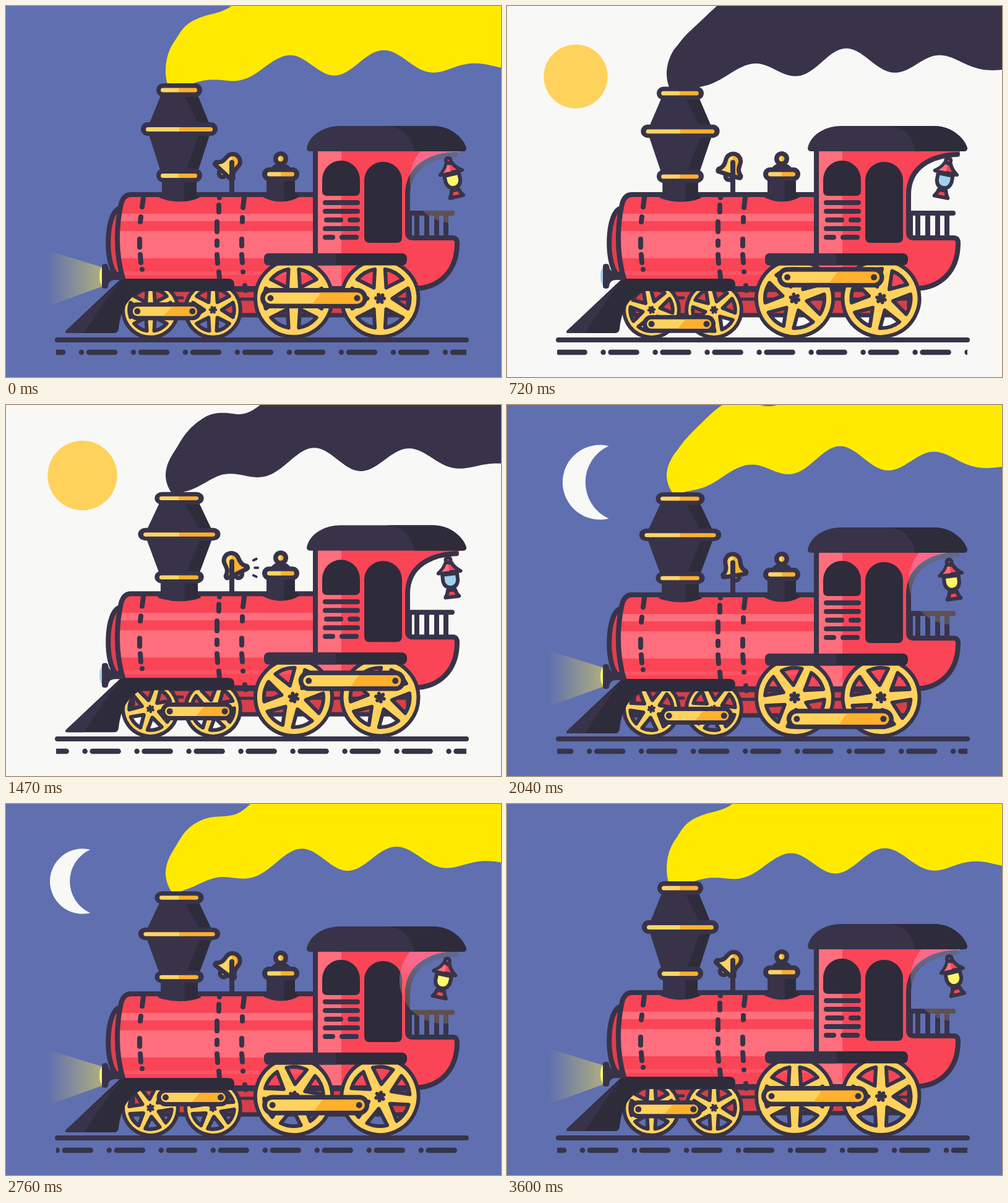
Animation of 800 by 600 pixels, one loop 3.63 s. Source, as an HTML page:

```html
<!DOCTYPE html>
<html lang="en">
<head>
<meta charset="utf-8">
<title>Steam train, day and night</title>
<style>
  html, body { margin: 0; height: 100%; overflow: hidden; }
  svg { display: block; width: 800px; height: 600px;
    --dark: #383349; --deep: #2e2b3b; --red: #fa4557; --pink: #ff6e7c; --gold: #ffd25c; --amber: #ffb02d;
    --sky: #f8f8f6; --smoke: #383349; --glass: #a0d0f2; background: var(--sky); }
  svg.night { --sky: #5f6fb0; --smoke: #ffea00; --glass: #fff66a; }
  svg:not(.night) .lit { display: none; }
  .dark { fill: var(--dark); } .deep { fill: var(--deep); }
  .red { fill: var(--red); } .pink { fill: var(--pink); }
  .gold { fill: var(--gold); } .amber { fill: var(--amber); } .glass { fill: var(--glass); }
  .split { fill: url(#split); }
  .line { stroke: var(--dark); stroke-width: 8; stroke-linecap: round; stroke-linejoin: round; }
  .open { fill: none; }
</style>
</head>
<body>
<svg id="stage" viewBox="0 0 800 600">
  <defs>
    <linearGradient id="split"><stop offset=".5" stop-color="#ffd567"/><stop offset=".5" stop-color="#ffb02d"/></linearGradient>
    <linearGradient id="bellGold" gradientUnits="userSpaceOnUse" x1="-40" x2="40">
      <stop offset=".5" stop-color="#ffd567"/><stop offset=".5" stop-color="#ffb02d"/>
    </linearGradient>
    <linearGradient id="beam"><stop stop-color="#ffee50" stop-opacity="0"/><stop offset="1" stop-color="#ffee50" stop-opacity=".5"/></linearGradient>
    <linearGradient id="glowFill" x2="0" y2="1"><stop offset=".3" stop-color="#5f698c"/><stop offset=".7" stop-color="#5f5052"/></linearGradient>
    <clipPath id="track"><path d="M81 550H744V570H81Z"/></clipPath>
    <g id="wheel">
      <path id="rim" class="gold line" fill-rule="evenodd" vector-effect="non-scaling-stroke" style="stroke-width:6"/>
      <circle class="dark" r="6"/>
      <circle r="6.5" fill="none" class="line" style="stroke-width:6" stroke-dasharray="0 6.807"/>
    </g>
  </defs>

  <circle id="sun" class="gold" r="52"/>
  <path id="moon" fill="#f8f8f6" d="M13-51A52.5 52.5 0 1 0 13 51A56 56 0 0 1 13-51Z"/>
  <path id="smoke" fill="var(--smoke)"/>

  <g class="bob">
    <path class="lit" fill="url(#beam)" d="M157 423L66 395V486L157 453Z"/>
    <!-- chassis -->
    <path class="line" fill="#d63f49" style="stroke-width:7" d="M205 459H650V500H205Z"/>
    <path class="line open" style="stroke-width:5" d="M378 474H650M274 472H285"/>
    <!-- boiler -->
    <path class="line" fill="#de404f" d="M186 327C160 328 158 425 182 438"/>
    <path class="red" d="M500 305H202Q190 305 186 320Q172 385 190 445L370 457H500Z"/>
    <path class="pink" d="M185 336H500V348H185ZM182 364H500V408H182Z"/>
    <path fill="#fc5465" d="M190 429H500V435H190Z"/>
    <path class="line open" d="M500 305H202Q190 305 186 320Q172 385 190 445M370 457H500"/>
    <path class="line open" d="M222 310L220 325M218 341L217 349M216 377V390M217 402L218 415M220 426V426M345 310V310M344 322V333M341 349V365M341 380V387M341 402L342 416M344 430L345 440M385 310L383 326M382 342V349M381 377V388M381 402L382 415M383 430V430M386 452L387 460"/>
    <!-- cab -->
    <g class="line open">
      <path d="M654 335H721"/>
      <path style="stroke-linecap:butt" d="M664 335V374M680 335V374M696 335V374M711 335V374M652 335V374"/>
    </g>
    <path class="red" d="M500 230H732V240C690 241 649 258 649 305V366Q649 375 658 375H722Q730 375 729 386C728 430 700 456 660 457H500Z"/>
    <path class="pink" d="M504 230H542V457H504Z"/>
    <path class="line open" d="M500 232V402M728 240C690 241 649 258 649 305V366Q649 375 658 375H722Q730 375 729 386C728 430 700 456 660 457H500"/>
    <path class="deep" d="M511 281a30.5 31 0 0 1 61 0V299q0 8-8 8H519q-8 0-8-8ZM579 282a30.5 30 0 0 1 61 0V374q0 9-9 9H588q-9 0-9-9Z"/>
    <path class="line open" d="M516 318H568M516 332H568M518 346H541M556 346H568M516 360H568M516 374H528M543 374H566"/>
    <g class="roof">
      <circle id="glow" class="lit" r="70" fill="url(#glowFill)" style="mix-blend-mode:lighten"/>
      <g id="lantern" class="line" style="stroke-width:6">
        <circle class="pink" cy="4" r="4"/>
        <path class="red" d="M-5 9H5Q8 17 18 24H-18Q-8 17-5 9Z"/>
        <path class="pink" stroke="none" d="M-4 11H0V22H-13Q-6 17-4 11Z"/>
        <path class="glass" d="M-12 27H12V38Q10 49 0 49T-12 38Z"/>
        <path class="red" d="M-6 53H6Q7 59 11 64H-11Q-7 59-6 53Z"/>
      </g>
    </g>
    <g class="roof">
      <path class="dark" d="M486 230C490 208 515 194 540 194H690C720 194 740 215 744 230Q744 235 738 235H492Q486 235 486 230Z"/>
      <path class="deep" d="M615 194H690C720 194 740 215 744 230Q744 235 738 235H660Q652 196 615 194Z"/>
    </g>
    <!-- steam dome -->
    <path class="dark" d="M421 276H467V302Q475 306 473 309Q444 324 415 309Q413 306 421 302Z"/>
    <path class="deep" d="M449 276H467V302Q475 306 473 309Q463 315 449 316Z"/>
    <path class="dark" d="M426 265Q432 254 444 254T462 265Z"/>
    <circle class="dark" cx="444" cy="247" r="12"/>
    <circle class="split" cx="444" cy="247" r="4.5"/>
    <rect class="dark" x="414" y="261" width="60" height="22" rx="11"/>
    <rect class="split" x="422" y="268.500" width="44" height="7" rx="3.500"/>
    <!-- bell -->
    <g transform="translate(365 253)">
      <g id="bell" class="line" style="stroke-width:7">
        <circle cx="1" cy="23" r="6" fill="url(#bellGold)"/>
        <path fill="url(#bellGold)" d="M-12-2A12 12 0 0 1 12-2V4Q12 12 19 17Q20 21 17 21H-17Q-20 21-19 17Q-12 12-12 4Z"/>
      </g>
      <path class="line" d="M0 0V50"/>
      <path id="ring" class="line open" style="stroke-width:4"/>
    </g>
    <!-- chimney -->
    <g id="stack">
      <path class="dark" d="M252 140H308L332 199L308 274V306Q314 308 312 310Q280 323 248 310Q246 308 252 306V274L228 199Z"/>
      <path class="deep" d="M286 140H308L332 199L308 274V306Q314 308 312 310Q302 315 288 316V274L315 199Z"/>
      <g class="dark">
        <rect x="243" y="125" width="74" height="22" rx="11"/>
        <rect x="218" y="188" width="124" height="22" rx="11"/>
        <rect x="243" y="263" width="74" height="22" rx="11"/>
      </g>
      <g class="split">
        <rect x="250" y="132.500" width="59" height="7" rx="3.500"/>
        <rect x="226" y="196" width="108" height="7" rx="3.500"/>
        <rect x="250" y="271" width="59" height="7" rx="3.500"/>
      </g>
    </g>
  </g>

  <g id="wheels"></g>
  <g id="rods"></g>

  <g class="bob">
    <path class="deep" d="M186 441H360Q369 441 369 451T360 461H218Q186 478 182 522Q181 529 175 529H98Q94 528 98 524Z"/>
    <path class="dark" d="M188 443L98 524Q94 528 98 529H126L168 466Z"/>
    <path class="glass" d="M157 421Q151 424 151 437T157 453Z"/>
    <path class="dark" d="M155 421q0-4 5-4t5 4q1 9 11 9H190V443H176q-10 0-11 10q0 4-5 4t-5-4Z"/>
    <rect class="deep" x="417" y="400" width="231" height="19.500" rx="8"/>
    <path class="dark" d="M533 400H425Q417 400 417 408V411.500Q417 419.500 425 419.500H533Z"/>
  </g>

  <path class="line" d="M83 540H744"/>
  <g clip-path="url(#track)"><path id="sleepers" class="line" style="stroke-width:8.500" stroke-dasharray="42 30 0 12" d="M-84 560H800"/></g>
</svg>

<script>
const LOOP = 3630, STEP = 30, CYCLE = 3600, DAWN = 30, DUSK = 1830;
const $ = id => document.getElementById(id);
const rad = deg => deg * Math.PI / 180;
const place = (el, transform) => el.setAttribute('transform', transform);
// cosine running `turns` times per cycle
const wave = (t, turns, shift = 0) => Math.cos(2 * Math.PI * turns * t / CYCLE + rad(shift));

const polar = (r, deg) => `${r * Math.cos(rad(deg))} ${r * Math.sin(rad(deg))}`;
let rim = 'M62 0A62 62 0 1 1-62 0A62 62 0 1 1 62 0Z';
for (let a = 0; a < 360; a += 60)
  rim += `M${polar(20, a)}L${polar(48, a - 20)}A48 48 0 0 1 ${polar(48, a + 20)}Z`;
$('rim').setAttribute('d', rim);

const wheels = [[233.5, 491.5, .715, 6], [334.5, 491.5, .715, 6], [465, 473, 1, 4], [604.5, 473, 1, 4]];
$('wheels').innerHTML = '<use href="#wheel"/>'.repeat(wheels.length);

// cx, cy, rx, ry, phase, turns, length, outer radius, inner radius
const rods = [[238.6, 490.8, 26.5, 24, 173, 6, 89, 14.5, 7.5], [464.5, 472.5, 37, 35.5, 180, 4, 140, 16.5, 9]];
const capsule = (len, r, cls) => `<rect class="${cls}" x="${-r}" y="${-r}" width="${len + 2 * r}" height="${2 * r}" rx="${r}"/>`;
$('rods').innerHTML = rods.map(([, , , , , , len, outer, r]) => `<g>${capsule(len, outer, 'dark')}${capsule(len, r, 'gold')}
  <path class="amber" d="M${len / 2 + 11} ${-r}H${len}a${r} ${r} 0 0 1 0 ${2 * r}H${len / 2 - 2}Z"/>
  <circle class="dark" r="5"/><circle class="dark" cx="${len}" r="5"/></g>`).join('');

// Catmull-Rom through evenly spaced values
function curve(values, x0, gap, x) {
  const u = (x - x0) / gap, i = Math.floor(u), f = u - i;
  const v = k => values[Math.max(0, Math.min(values.length - 1, i + k))];
  const [a, b, c, d] = [v(-1), v(0), v(1), v(2)];
  return b + f / 2 * (c - a + f * (2 * a - 5 * b + 4 * c - d + f * (3 * (b - c) + d - a)));
}
const between = (low, high, c) => (low + high) / 2 + (high - low) / 2 * c;

const TOP_HIGH = [88, 46, 20, 0, -18, -27, -32, -40, -50], TOP_LOW = [90, 57, 36, 24, 16, 7, 1, -8, -30];
const BASE_HIGH = [142, 107, 79, 67, 67, 73, 88, 98], BASE_LOW = [142, 126, 113, 109, 106, 104, 102, 100];

function smokePath(t, stretch) {
  const ripple = (x, crest) => Math.cos(2 * Math.PI * ((x - crest) / 160 - 8 * t / CYCLE));
  const top = x => between(curve(TOP_HIGH, 260, 30, x), curve(TOP_LOW, 260, 30, x), ripple(x, 345)) - 16 * stretch;
  const base = x => between(curve(BASE_HIGH, 280, 80, x), curve(BASE_LOW, 280, 80, x), -ripple(x, 612))
    + stretch * Math.min(4, -12 + (x - 280) * .1);
  let d = `M270 146C254 124 254 ${top(270) + 25} 270 ${top(270)}`;
  for (let x = 274; x <= 500; x += 4) d += `L${x} ${top(x)}`;
  d += 'L820-60';
  for (let x = 820; x >= 290; x -= 5) d += `L${x} ${base(x)}`;
  return d + 'Z';
}

// springs in after `start`, and out in reverse before `end`
function pop(t, start, end) {
  const u = Math.min(t - start, end - t);
  return u <= 0 ? 0 : 1 - Math.exp(-.0065 * u) * Math.cos(Math.PI * u / 300);
}

function ringPath(phase) {
  const p = (phase % 180 - 28) / 42;
  if (p < 0 || p > 1) return '';
  const side = phase % 360 < 180 ? -1 : 1, inner = 31 + 13 * p, len = 20 * p * (1 - p);
  return [-20, 0, 20].map(a => {
    const x = Math.cos(rad(a)), y = Math.sin(rad(a * 1.3));
    return `M${side * inner * x} ${10 + inner * y * .75}l${side * len * x} ${len * y}`;
  }).join('');
}

function draw(t) {
  $('stage').classList.toggle('night', t < DAWN || t >= DUSK);

  const sun = pop(t, DAWN, DUSK - 2), moon = pop(t, DUSK, CYCLE);
  place($('sun'), `translate(${143 * sun - 31} 114) scale(${sun})`);
  place($('moon'), `translate(${180.5 * moon - 58} 125) scale(${moon})`);

  const bob = 1 - wave(t, 15), squash = (1 - wave(t, 6)) / 2;
  document.querySelectorAll('.bob, .roof').forEach(el => place(el, `translate(0 ${bob})`));
  place($('stack'), `translate(280 325) scale(${1 + .075 * squash} ${1 - .079 * squash}) translate(-280 -325)`);
  $('smoke').setAttribute('d', smokePath(t, 1 - squash));

  wheels.forEach(([x, y, size, turns], i) =>
    place($('wheels').children[i], `translate(${x} ${y}) scale(${size}) rotate(${-360 * turns * t / CYCLE})`));
  rods.forEach(([cx, cy, rx, ry, phase, turns], i) => {
    const a = rad(phase - 360 * turns * t / CYCLE);
    place($('rods').children[i], `translate(${cx + rx * Math.cos(a)} ${cy + ry * Math.sin(a)})`);
  });

  const swing = 43 * wave(t, 4, 6);
  place($('bell'), `rotate(${swing})`);
  $('bellGold').setAttribute('gradientTransform', `rotate(${-swing})`);
  $('ring').setAttribute('d', ringPath(t * .4));

  const sway = -13 * wave(t, 2, 6);
  place($('lantern'), `translate(714 246) rotate(${sway})`);
  place($('glow'), `translate(${714 - 38 * Math.sin(rad(sway))} 281)`);

  $('sleepers').style.strokeDashoffset = -((50 + 84 * 32 * t / CYCLE) % 84);
}

function tick() {
  draw(Math.floor(performance.now() % LOOP / STEP) * STEP);
  requestAnimationFrame(tick);
}
tick();
</script>
</body>
</html>
```
